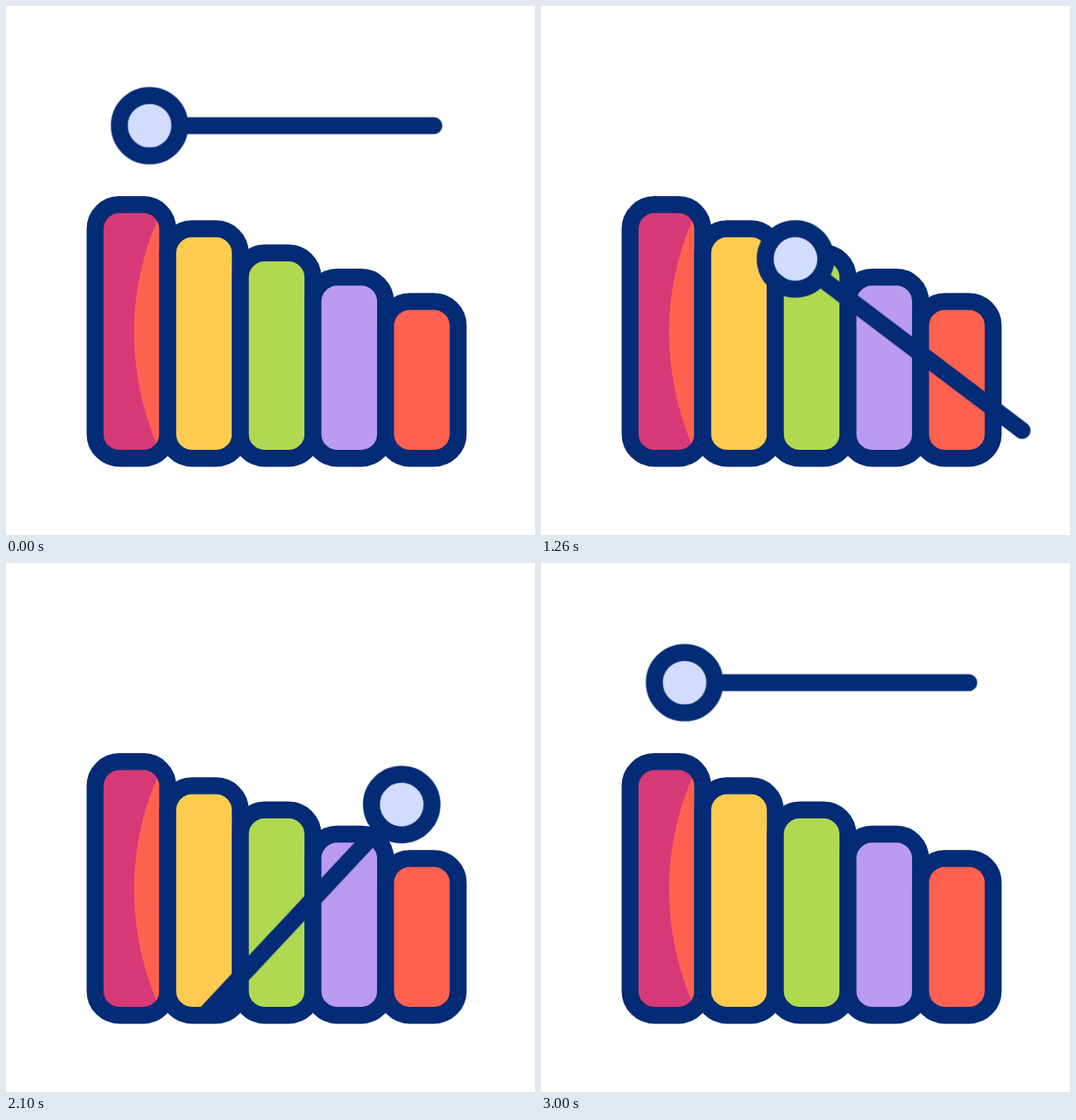
Animation, 640 px wide and 640 px high, one loop 3200 ms. Source, as an HTML page:

```html
<!DOCTYPE html>
<html lang="en">
<head>
<meta charset="utf-8">
<title>Xylophone</title>
<style>
  html, body { margin: 0; width: 100%; height: 100%; overflow: hidden; background: #fff; }
  svg { display: block; width: 100vw; height: 100vh; }

  .line { stroke: #042b75; stroke-width: 20.5; stroke-linecap: round; }
  .bar, .wave, .mallet {
    animation: 3.2s cubic-bezier(.3333, 0, .6667, 1) infinite;
  }
  .hit1 { --hit: 0s; }
  .hit2 { --hit: .8s; }
  .hit3 { --hit: 1.6s; }

  .bar { animation-name: press; animation-delay: var(--hit); }
  .wave {
    --dx: -19px;
    opacity: 0;
    fill: none;
    animation-name: drift, flash;
    animation-timing-function: cubic-bezier(.3333, 0, .6667, 1), linear;
    animation-delay: var(--hit);
  }
  .wave.hit3 { --dx: 19px; }
  .mallet { animation-name: play; }

  @keyframes press {
    0%, 19.3% { transform: translateY(0); }
    24.6% { transform: translateY(14px); }
    31.25%, 100% { transform: translateY(0); }
  }
  @keyframes drift {
    0%, 25% { transform: translate(0, 0); }
    37.5%, 100% { transform: translate(var(--dx), -19px); }
  }
  @keyframes flash {
    0%, 25% { opacity: 0; }
    31.25% { opacity: 1; }
    37.5%, 100% { opacity: 0; }
  }
  /* The mallet turns about the tip of its handle. */
  @keyframes play {
    0%, 6.25% { transform: translate(517.6px, 144.7px) rotate(0deg); }
    18.75% { transform: translate(479.7px, 436.3px) rotate(60.5deg); }
    25% { transform: translate(479.7px, 436.3px) rotate(14.2deg); }
    31.25% { transform: translate(479.7px, 436.3px) rotate(40.3deg); }
    43.75% { transform: translate(621.6px, 543.3px) rotate(35.9deg); }
    50% { transform: translate(621.6px, 543.3px) rotate(27deg); }
    56.25% { transform: translate(621.6px, 543.3px) rotate(40deg); }
    68.75% { transform: translate(175.2px, 543.3px) rotate(150deg); }
    75% { transform: translate(175.2px, 543.3px) rotate(162deg); }
    81.25% { transform: translate(175.2px, 543.3px) rotate(150deg); }
    93.75%, 100% { transform: translate(517.6px, 144.7px) rotate(0deg); }
  }
</style>
</head>
<body>
<svg viewBox="0 0 640 640" xmlns="http://www.w3.org/2000/svg">
  <g class="bar hit1">
    <rect x="107.8" y="240.3" width="87.85" height="306.9" rx="29.3" fill="#d63a76"/>
    <path d="M184 257C145.5 345 145.5 440 182 530H195V257Z" fill="#ff6150"/>
    <rect class="line" x="107.8" y="240.3" width="87.85" height="306.9" rx="29.3" fill="none"/>
  </g>
  <rect class="line" x="195.65" y="269.6" width="87.85" height="277.6" rx="29.3" fill="#fdcb50"/>
  <rect class="line bar hit2" x="283.5" y="298.8" width="87.85" height="248.4" rx="29.3" fill="#b0d952"/>
  <rect class="line" x="371.35" y="328.1" width="87.85" height="219.1" rx="29.3" fill="#bb9af2"/>
  <rect class="line bar hit3" x="459.2" y="357.4" width="87.85" height="189.8" rx="29.3" fill="#ff6150"/>

  <path class="line wave hit1" d="M133 211.5c-42 2-67 32-64.7 75.7"/>
  <path class="line wave hit2" d="M308 270.6c-42 3-69 36-66 83.4"/>
  <path class="line wave hit3" d="M518.5 326c41 3 65 34 65 80"/>

  <g class="mallet">
    <path class="line" d="M0 0H-307" fill="none"/>
    <circle class="line" cx="-343.9" r="36.6" fill="#d2dcfd"/>
  </g>
</svg>
</body>
</html>
```
